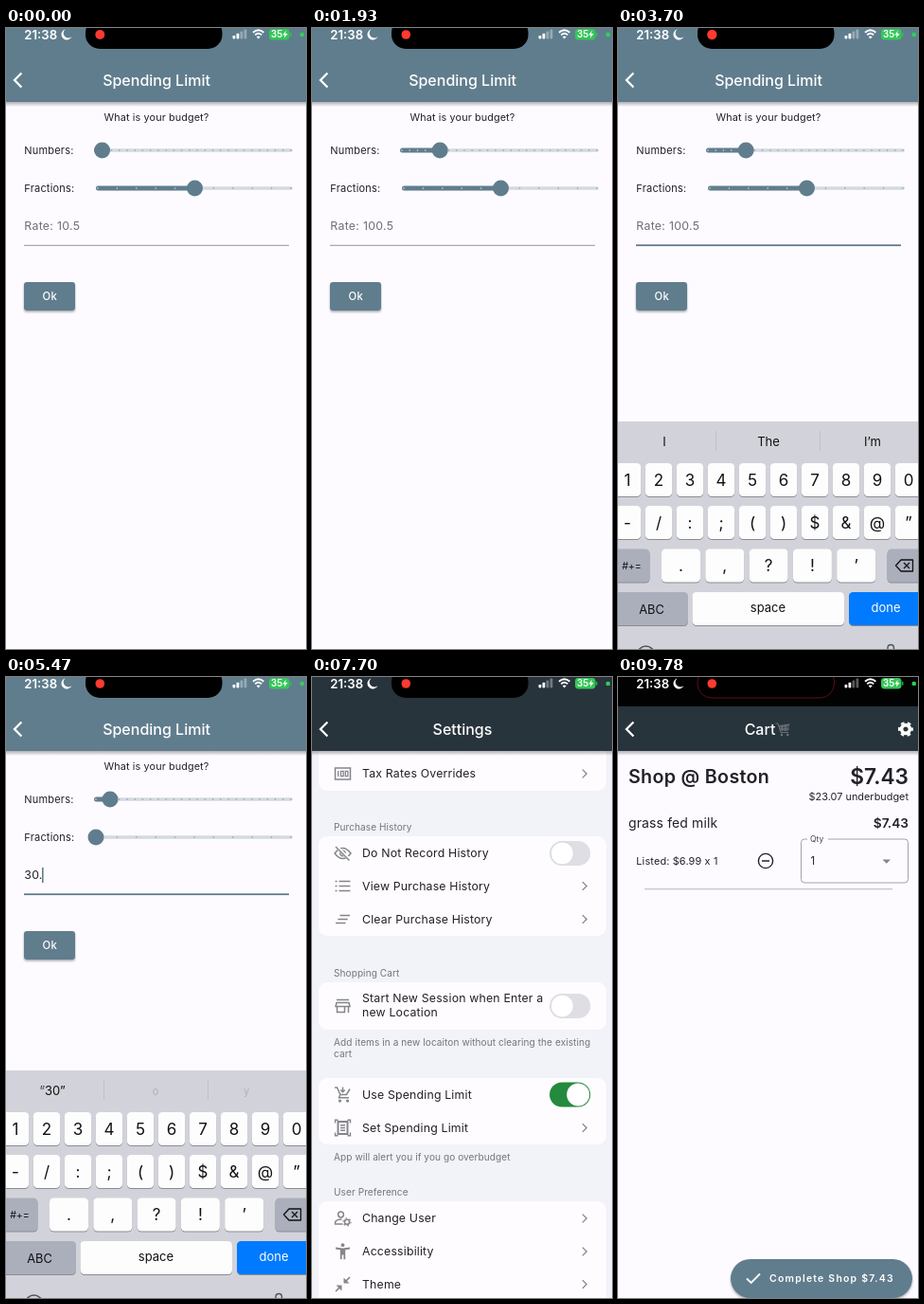
An HTML page that plays this animation: 317x655 px, repeating every 9.95 s.

```html
<!DOCTYPE html>
<html lang="en">
<head>
<meta charset="utf-8">
<title>Spending limit</title>
<style>
html, body { margin: 0; width: 100%; height: 100%; overflow: hidden; background: #fdfbff; }
svg { display: block; width: 100vw; height: 100vh; font-family: Inter, Roboto, sans-serif; }
text { white-space: pre; }
</style>
</head>
<body>
<svg id="stage" viewBox="0 0 317 655">
  <defs>
    <linearGradient id="fall" x1="0" y1="0" x2="0" y2="1">
      <stop offset="0" stop-color="#000" stop-opacity=".3"/>
      <stop offset="1" stop-color="#000" stop-opacity="0"/>
    </linearGradient>
    <filter id="soft" x="-20%" y="-40%" width="140%" height="200%">
      <feDropShadow dx="0" dy="1.5" stdDeviation="1.3" flood-opacity=".35"/>
    </filter>
    <clipPath id="okClip"><rect x="19" y="268" width="54" height="30" rx="3"/></clipPath>
  </defs>
  <g id="cart"></g>
  <g id="settings"></g>
  <g id="limit"></g>
  <g id="keyboard"></g>
  <g id="status"></g>
</svg>
<script>
const LOOP = 9950, TICK = 148, W = 317;
const MAIN = '#607d8d', DARK = '#28343c', INK = '#222126', GREY = '#85858b', PAPER = '#fdfbff';
const $ = id => document.getElementById(id);

const clamp = v => Math.max(0, Math.min(1, v));
const span = (t, a, b) => clamp((t - a) / (b - a));
const inOut = p => p * p * (3 - 2 * p);
const out = p => 1 - (1 - p) ** 3;

const rect = (x, y, w, h, fill, rx = 0, more = '') =>
  `<rect x="${x}" y="${y}" width="${w}" height="${h}" rx="${rx}" fill="${fill}" ${more}/>`;
const disc = (x, y, r, fill, more = '') => `<circle cx="${x}" cy="${y}" r="${r}" fill="${fill}" ${more}/>`;
const line = (d, color, w = 1.5, more = '') =>
  `<path d="${d}" fill="none" stroke="${color}" stroke-width="${w}" ${more}/>`;
const shape = (d, fill, more = '') => `<path d="${d}" fill="${fill}" ${more}/>`;
// cy is the middle of the capitals
const text = (x, cy, s, size, fill = INK, weight = 400, anchor = 'start', gap = 0) =>
  `<text x="${x}" y="${(cy + size * 0.36).toFixed(2)}" font-size="${size}" fill="${fill}" font-weight="${weight}" text-anchor="${anchor}" letter-spacing="${gap}">${s}</text>`;
const label = (x, cy, s, size, gap, fill = INK) => text(x, cy, s, size, fill, 400, 'start', gap);

function appBar(title, color, x = 159) {
  return rect(0, 78, W, 5, 'url(#fall)') + rect(0, 0, W, 78, color) +
    line('M16.4 47.5L9 55L16.4 62.5', '#fff', 2.3) +
    text(x, 55, title, 16, '#fff', 500, 'middle');
}

/* spending limit page */

function slider(y, x0, pos, parts, glow) {
  const end = 303, mid = x0 < 95 ? 95 : x0;
  let s = rect(mid, y - 1.8, end - mid, 3.6, '#d3dae0', 1.8);
  if (pos > x0) s += rect(x0, y - 2.5, pos - x0, 5, MAIN, 2.5);
  const step = (end - x0 - 4) / parts;
  for (let i = 0; i <= parts; i++) {
    const x = x0 + 2 + step * i;
    s += disc(x.toFixed(1), y, 0.8, x < pos ? '#d3dde3' : '#8c9fab');
  }
  if (glow) s += disc(pos, y, 19, MAIN, 'opacity=".13"');
  return s + disc(pos, y, 8.5, MAIN);
}

const TYPED = [[31, '3'], [34, '30'], [36, '30.'], [40, '30.5']];

function limitState(n, t) {
  const up = 1 + 19 * inOut(span(t, 100, 1190));
  const steps = t < 1200 ? up : 20 - 15 * inOut(span(t, 1240, 1800));
  let num = n < 1 ? 10 : 20 * Math.round(steps), frac = 0.5, typed = '', since = 2100;
  for (const [at, s] of TYPED) if (n >= at) { typed = s; since = at * TICK; }
  if (typed) {
    num = Math.floor(+typed);
    frac = +typed - num;
  }
  return {
    num, frac, typed,
    drag: n >= 1 && t < 1850,
    focus: t > 2200,
    caret: t > 2200 && Math.floor((t - since) / 500) % 2 === 0,
    press: span(t, 6500, 6900)
  };
}

function drawLimit(n, t) {
  const s = limitState(n, t);
  const hot = s.press > 0;
  let g = rect(0, 0, W, 655, PAPER) + appBar('Spending Limit', MAIN);
  g += text(159, 93.7, 'What is your budget?', 10.8, INK, 400, 'middle', 0.12);
  g += label(19.3, 129, 'Numbers:', 11, 0.2) + slider(129, 93, 93.2 + 8.4 * Math.round(s.num / 20), 25, s.drag);
  g += label(19.3, 169, 'Fractions:', 11, 0.2) + slider(169, 95, 95 + 209 * s.frac, 10, false);
  g += s.typed ? label(19.3, 209, s.typed, 12.3, 0.25) : label(19.3, 209, `Rate: ${s.num + s.frac}`, 12.3, 0.3, '#6f6e74');
  if (s.caret) g += rect([19, 27, 35, 38, 46][s.typed.length], 201, 1.6, 16, MAIN);
  g += s.focus ? rect(19, 228.3, 280, 1.8, MAIN) : rect(19, 228.8, 280, 0.9, '#88878c');
  g += rect(19, 268, 54, 30, hot ? '#6c8694' : MAIN, 3, 'filter="url(#soft)"');
  if (hot) g += `<g clip-path="url(#okClip)">${disc(46, 292, 5 + 14 * s.press, '#fff', 'opacity=".22"')}</g>`;
  g += text(46.3, 283, 'Ok', 11.3, '#fff', 500, 'middle', 0.3);
  $('limit').innerHTML = g;
}

/* keyboard */

const ROWS = ['1234567890', '-/:;()$&amp;@”'];
const key = (x, y, w, name, size = 17, fill = '#fdfdfe', ink = '#111') =>
  rect(x, y + 1, w, 35, '#8b8d93', 4.5) + rect(x, y, w, 35, fill, 4.5) +
  text(x + w / 2, y + 17.5, name, size, ink, 400, 'middle');

const KEYS = (() => {
  let g = rect(0, 415, W, 245, '#d2d3da');
  g += rect(103, 425, 1, 21, '#bfc0c8') + rect(213, 425, 1, 21, '#bfc0c8');
  ROWS.forEach((row, r) => row.match(/&amp;|./g).forEach((c, i) => {
    g += key(-4.2 + 33 * i, 459 + 45 * r, 28.4, c);
  }));
  [...'.,?!’'].forEach((c, i) => { g += key(46 + 46.3 * i, 549.5, 41, c); });
  g += key(-8, 549.5, 41.5, '', 11, '#abafbc') + text(14.5, 567, '#+=', 10.5, '#111', 400, 'middle');
  g += key(284.5, 549.5, 42, '', 11, '#abafbc');
  g += line('M293.5 567L299 561H311.5V573H299Z', '#111', 1.3, 'stroke-linejoin="round"') +
    line('M302 564L308 570M308 564L302 570', '#111', 1.3);
  g += key(-8, 595, 82, '', 13, '#abafbc') + text(35.5, 613, 'ABC', 12.8, '#111', 400, 'middle');
  g += key(78.5, 595, 160.5, '') + text(158.5, 611.5, 'space', 13, '#111', 400, 'middle');
  g += key(244, 595, 82, '', 13, '#007aff') + text(283, 611.5, 'done', 13, '#fff', 400, 'middle');
  g += disc(29.5, 661, 9, 'none', 'stroke="#50535b" stroke-width="1.5"');
  return g + rect(285, 650.5, 6.5, 14, 'none', 3.2, 'stroke="#50535b" stroke-width="1.4"');
})();

function hints(n) {
  if (n < 31) return ['I', 'The', 'I’m'];
  if (n < 34) return ['“3”', '', ''];
  if (n < 39) return ['“30”', '', ''];
  return n < 40 ? ['', '', ''] : ['“5”', '', ''];
}

function popover(i, name) {
  const x = Math.min(10 + 33 * i, 302), l = x - 21, r = x + 21, a = x - 14, b = x + 14;
  return shape(`M${l + 6} 412H${r - 6}Q${r} 412 ${r} 418V444C${r} 452 ${b} 452 ${b} 462V490Q${b} 494 ${b - 4} 494H${a + 4}Q${a} 494 ${a} 490V462C${a} 452 ${l} 452 ${l} 444V418Q${l} 412 ${l + 6} 412Z`,
    '#fdfdfe', 'filter="url(#soft)"') + text(x, 433, name, 25, '#111', 400, 'middle');
}

function drawKeyboard(n, t) {
  const rise = out(span(t, 2180, 2700)) - inOut(span(t, 6670, 6950));
  const k = $('keyboard');
  k.setAttribute('transform', `translate(0 ${(245 * (1 - rise)).toFixed(1)})`);
  let g = KEYS;
  hints(n).forEach((s, i) => { g += text(49 + 110 * i, 436, s, 13, '#111', 400, 'middle'); });
  if (n >= 36 && n < 39) {
    g += text(35, 437, '“', 12, '#a5a6ae') + text(158, 437, 'o', 11, '#b0b1b9', 400, 'middle') +
      text(254, 437, 'y', 11, '#b0b1b9', 400, 'middle');
  }
  const hit = { 31: [2, '3'], 34: [9, '0'], 40: [4, '5'] }[n];
  if (hit) g += popover(...hit);
  k.innerHTML = rise > 0.001 ? g : '';
}

/* settings page */

const chevron = y => line(`M285.8 ${y - 4.4}L290.2 ${y}L285.8 ${y + 4.4}`, '#808086', 1.2);
const toggle = (y, on) => rect(251, y - 13, 43.2, 26, on ? '#248a3d' : '#dfdee4', 13) +
  disc(on ? 281.2 : 264.4, y, 12, '#fff', on ? '' : 'stroke="#d0cfd6" stroke-width=".7"');

// icons are drawn around 0,0
const ICONS = {
  rates: rect(-8, -6, 16, 12, 'none', 0, `stroke="${GREY}" stroke-width="1.5"`) +
    line('M-4.8 -3V3M-2 -2.7H.6V2.7H-2ZM2.8 -2.7H5.4V2.7H2.8Z', GREY, 1.3),
  hidden: line('M-8.5 0Q0 -11 8.5 0Q0 11 -8.5 0Z', GREY) + disc(0, 0, 2.7, 'none', `stroke="${GREY}" stroke-width="1.5"`) +
    line('M-7 -7.5L7.5 7', '#fefcff', 3.4) + line('M-7.5 -7L7 7.5', GREY),
  list: line('M-8 -5H-6M-8 0H-6M-8 5H-6M-4 -5H8M-4 0H8M-4 5H8', GREY, 1.6),
  clear: line('M-3 -4H7.5M-5.2 0H5.2M-7.5 4H3', GREY, 1.6),
  store: line('M-6.5 -6.5H6.5M-6.5 -3.5H6.5L7.5 .5H-7.5ZM-6 .5V6.5H2V.5M6 .5V7', GREY),
  trolley: line('M-8.5 -7.5H-6L-2.6 0H4L7.5 -6M-2.6 0L-4 3.2H6.5M0 -8V-3M-2.2 -5L0 -2.8L2.2 -5', GREY) +
    disc(-3, 6.6, 1.6, GREY) + disc(5, 6.6, 1.6, GREY),
  receipt: rect(-5, -6.5, 10, 13, 'none', 0, `stroke="${GREY}" stroke-width="2"`) +
    line('M-2.5 -2.7H2.5M-2.5 0H2.5M-2.5 2.7H2.5M-8 -5V-8.3H-5M5 -8.3H8V-5M8 5V8.3H5M-5 8.3H-8V5', GREY, 1.4),
  user: disc(-2, -4, 2.9, 'none', `stroke="${GREY}" stroke-width="1.5"`) +
    line('M0 6H-8V4Q-7 1 -1 1', GREY) + disc(4.5, 3.8, 2.6, 'none', `stroke="${GREY}" stroke-width="1.6"`) +
    disc(4.5, 3.8, 4, 'none', `stroke="${GREY}" stroke-width="1.2" stroke-dasharray="1.5 2.69"`),
  person: disc(0, -6.8, 1.9, GREY) + shape('M-7.5 -4.4Q0 -2.8 7.5 -4.4V-2.6L2.7 -1.8V8.3H.9V3.5H-.9V8.3H-2.7V-1.8L-7.5 -2.6Z', GREY),
  theme: line('M7.5 -7.5L2 -2M-7.5 7.5L-2 2', GREY, 1.7) + shape('M1 -7V-1H7ZM-1 7V1H-7Z', GREY)
};

const ITEMS = [
  [102, 'rates', 'Tax Rates Overrides'], [186, 'hidden', 'Do Not Record History', 'off'],
  [220.5, 'list', 'View Purchase History'], [255.5, 'clear', 'Clear Purchase History'],
  [347, 'store', '', 'off'], [440.5, 'trolley', 'Use Spending Limit', 'on'],
  [475.5, 'receipt', 'Set Spending Limit'], [571, 'user', 'Change User'],
  [606, 'person', 'Accessibility'], [640.5, 'theme', 'Theme']
];
const NOTES = [
  [158.5, 'Purchase History'], [312, 'Shopping Cart'],
  [385, 'Add items in a new locaiton without clearing the existing'], [397.5, 'cart'],
  [506, 'App will alert you if you go overbudget'], [543.5, 'User Preference']
];

function buildSettings() {
  const item = (y, s) => label(53, y, s, 12.3, 0.18);
  let g = rect(0, 0, W, 655, '#f2f2f9');
  for (const [a, b] of [[60, 120], [168, 273], [322, 372], [423, 493], [553, 675]])
    g += rect(7, a, 304, b - a, '#fefcff', 9);
  for (const [y, icon, s, sw] of ITEMS)
    g += `<g transform="translate(32.5 ${y})">${ICONS[icon]}</g>` + item(y, s) +
      (sw ? toggle(y, sw === 'on') : chevron(y));
  g += item(339, 'Start New Session when Enter a') + item(354, 'new Location');
  for (const [y, s] of NOTES) g += label(23, y, s, 10.05, 0.08, '#74747b');
  $('settings').innerHTML = g + appBar('Settings', DARK);
}

/* cart page */

function buildCart() {
  let g = rect(0, 0, W, 655, PAPER) + appBar('Cart', DARK, 150) + rect(0, 0, W, 31, '#020203');
  g += `<g transform="translate(174.5 55)">` +
    shape('M-5 -4L7 -6L5.5 2H-3Z', '#474f55') +
    line('M-8 -6H-5.5L-2.5 3.5H5.5M-4.5 -3L6.5 -4.5M-3.6 0H6M-1 -4V2M2.5 -5V2', '#737a7f', 0.9) +
    disc(-1.5, 6, 1.2, '#737a7f') + disc(4.8, 6, 1.2, '#737a7f') + '</g>';
  g += `<g transform="translate(304 55)">` + disc(0, 0, 4.4, 'none', 'stroke="#fff" stroke-width="3.6"') +
    disc(0, 0, 6.9, 'none', 'stroke="#fff" stroke-width="2.2" stroke-dasharray="3.7 3.526" stroke-dashoffset="1.85"') + '</g>';
  g += text(11, 105, 'Shop @ Boston', 19.7, INK, 600, 'start', 0.3) + text(307, 105, '$7.43', 22.7, INK, 600, 'end');
  g += text(307, 126.5, '$23.07 underbudget', 10.9, INK, 400, 'end');
  g += label(11, 154, 'grass fed milk', 14, 0.12) + text(307, 154, '$7.43', 13.7, INK, 600, 'end');
  g += label(19.3, 194.5, 'Listed: $6.99 x 1', 10.9, 0.15);
  g += disc(156, 194, 7.6, 'none', `stroke="${INK}" stroke-width="1.4"`) + line('M152 194H160', INK, 1.5);
  g += rect(193.5, 171, 113, 46, 'none', 3.5, 'stroke="#a3a2a8"') + rect(200, 169, 22, 4, PAPER);
  g += text(203, 171, 'Qty', 8.6, '#4a494e') + text(203.5, 194, '1', 11.3);
  g += shape('M279.5 192.5H288L283.75 196.8Z', '#85848a');
  g += rect(28, 222.8, 262, 1.6, '#cbcacf');
  g += rect(119, 614, 192, 41, MAIN, 20.5, 'filter="url(#soft)"') + line('M136 634.5L140.7 639L150 629.5', '#fff', 1.8);
  $('cart').innerHTML = g + text(160, 634.5, 'Complete Shop $7.43', 10.5, '#fff', 600, 'start', 1.2);
}

/* status bar */

function drawStatus(n, t) {
  const ring = span(t, 8300, 9000);
  let g = text(19.3, 6.8, '21:38', 13.2, '#fff', 600);
  g += shape('M62.4 1.4A5.7 5.7 0 1 0 69.4 9.2A4.7 4.7 0 0 1 62.4 1.4Z', '#fff');
  g += rect(84, -10, 144.5, 32, '#000', 15, ring ? `stroke="#5c1013" stroke-opacity="${ring.toFixed(2)}"` : '');
  g += disc(99.3, 7, (5 + 0.2 * Math.sin(n * 1.3)).toFixed(2), '#ff3a30');
  for (let i = 0; i < 4; i++)
    g += rect(239.5 + 4 * i, 8 - 2.2 * i, 2.8, 3.4 + 2.2 * i, '#fff', 0.8, i > 1 ? 'opacity=".35"' : '');
  g += line('M261 4.8Q266.7 -.4 272.4 4.8', '#fff', 1.9) + line('M263.2 7.3Q266.7 4.2 270.2 7.3', '#fff', 1.8) +
    shape('M264.7 9.2Q266.7 7.8 268.7 9.2L266.7 11.4Z', '#fff');
  g += rect(278, 1, 21.5, 11.4, '#34c759', 3.4) + rect(300.2, 4.8, 1.2, 4, '#34c759', 0.6);
  g += text(280, 6.8, '35', 9.8, '#fff', 600) + shape('M295.8 2.8L292.4 7.4H294.6L293.8 10.8L297.6 6.1H295.2Z', '#fff');
  $('status').innerHTML = g + disc(312.8, 7, 2.3, '#30d158');
}

function slide(id, x, shown) {
  $(id).setAttribute('transform', `translate(${x.toFixed(1)} 0)`);
  $(id).setAttribute('visibility', shown ? 'visible' : 'hidden');
}

// the screen refreshes in fixed ticks
function draw(ms) {
  const n = Math.floor((ms % LOOP + 12) / TICK), t = n * TICK;
  if (n === draw.last) return;
  draw.last = n;
  const a = inOut(span(t, 6680, 6950)), b = inOut(span(t, 8060, 9100));
  slide('limit', W * a, a < 1);
  slide('settings', a < 1 ? -105 * (1 - a) : W * b, a > 0 && b < 1);
  slide('cart', -105 * (1 - b), b > 0);
  if (a < 1) drawLimit(n, t);
  drawKeyboard(n, t);
  drawStatus(n, t);
}

buildSettings();
buildCart();
draw(0);
const start = performance.now();
(function loop() {
  draw(performance.now() - start);
  requestAnimationFrame(loop);
})();
</script>
</body>
</html>
```
